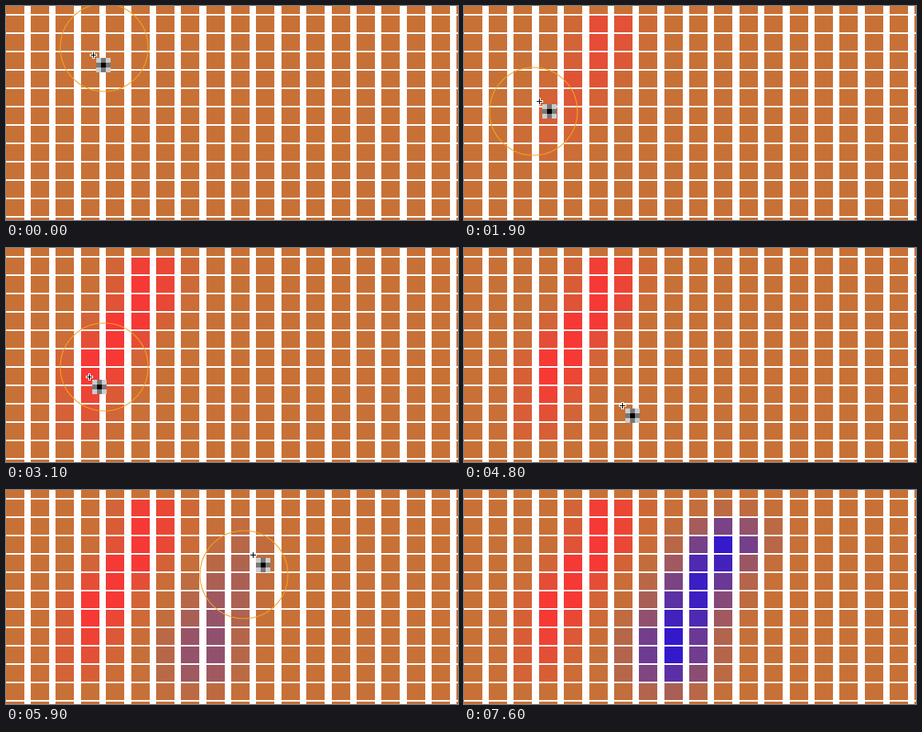
Animation of 566x268 px, one loop 8000 ms. Source, as an HTML page with a canvas:

```html
<!DOCTYPE html>
<html>
<head>
<meta charset="utf-8">
<style>
html, body { margin: 0; width: 100%; height: 100%; overflow: hidden; background: #fff; }
canvas { display: block; }
</style>
</head>
<body>
<canvas id="stage" width="566" height="268"></canvas>
<script>
const ctx = document.getElementById('stage').getContext('2d');
const LOOP = 8000, STEP = 100, LEAD = 60;
const BASE = [200, 113, 55];

const clamp = v => Math.max(0, Math.min(1, v));
const mix = (a, b, k) => a + (b - a) * k;

// Linear interpolation through key points; the first value of each is the parameter
function along(keys, p) {
  let i = keys.findIndex(k => k[0] >= p);
  if (i < 0) i = keys.length - 1;
  i = Math.max(1, i);
  const a = keys[i - 1], b = keys[i];
  const k = clamp((p - a[0]) / (b[0] - a[0]));
  return a.slice(1).map((v, n) => mix(v, b[n + 1], k));
}

// spine: row, centre column, strength; span: when a cell starts and stops filling
const strokes = [
  {
    color: [246, 57, 53], spread: 1.3,
    spine: [[0, 5.5, 0], [1, 5.4, 1], [3, 5.1, 1.35], [5, 4, 1.35],
            [6, 3.5, 1.35], [10, 2.65, 0.35], [11, 2.5, 0]],
    span: (c, r) => [100 + 200 * r, 2400 + 100 * r]
  },
  {
    color: [52, 25, 203], spread: 2,
    spine: [[0.8, 10.5, 0], [3, 10.1, 1], [5, 9.1, 0.95], [8, 8.05, 1],
            [9.5, 7.95, 1], [11.4, 7.8, 0]],
    span: c => [5000 + 230 * (c - 6.5), 6500 + 350 * (c - 7)]
  }
];

// time, brush x, brush y
const path = [
  [0, 123, 52], [300, 53, 102], [600, 223, 22], [900, 100, 95],
  [1200, 185, 30], [1500, 55, 127], [1700, 150, 60], [1900, 87, 132],
  [2300, 134, 52], [2600, 105, 206], [2900, 176, 60], [3100, 123, 149],
  [3200, 91, 171], [3500, 181, 55],
  [4800, 198, 198], [4860, 198, 198], [5000, 285, 78], [5200, 285, 78],
  [5400, 219, 202], [5600, 290, 90], [5750, 235, 190], [5900, 298, 106],
  [6000, 316, 66], [6300, 250, 213], [6600, 350, 55], [6800, 280, 150],
  [6900, 326, 69], [7100, 346, 52], [7300, 257, 212], [7600, 340, 62]
];

function cellColor(c, r, t) {
  let color = BASE;
  for (const { color: paint, spread, spine, span } of strokes) {
    const [centre, strength] = along(spine, r);
    const [from, to] = span(c, r);
    const level = clamp(strength * Math.exp(-((c - centre) ** 2) / spread));
    const k = level * clamp((t - from) / (to - from));
    color = color.map((v, n) => mix(v, paint[n], k));
  }
  return `rgb(${color.map(Math.round)})`;
}

function drawGrid(t) {
  for (let r = 0; r < 13; r++)
    for (let c = 0; c < 19; c++) {
      ctx.fillStyle = cellColor(c, r, t);
      ctx.fillRect(Math.round(31.38 * c - 0.4), 23 * r - 11, 23, 21);
    }
}

function drawBrush(x, y) {
  ctx.strokeStyle = '#f7a21b';
  ctx.lineWidth = 1.1;
  ctx.beginPath();
  ctx.arc(x, y, 55, 0, 2 * Math.PI);
  ctx.stroke();
}

function drawPointer(x, y) {
  const plus = (color, half, width) => {
    ctx.fillStyle = color;
    ctx.fillRect(x - half, y - width / 2, 2 * half, width);
    ctx.fillRect(x - width / 2, y - half, width, 2 * half);
  };
  plus('#fff', 4.5, 3);
  plus('#000', 3.5, 1);
  const shades = ['#000', '#777', '#ccc'];
  for (let i = 0; i < 9; i++) {
    const c = i % 3, r = Math.floor(i / 3);
    ctx.fillStyle = shades[Math.abs(c - 1) + Math.abs(r - 1)];
    ctx.fillRect(x + 3.5 + 6 * c, y + 3.5 + 6 * r, 6, 6);
  }
}

function draw(now) {
  const t = Math.floor((now % LOOP) / STEP) * STEP;
  ctx.fillStyle = '#fff';
  ctx.fillRect(0, 0, 566, 268);
  drawGrid(t);
  const painting = t < 3600 || (t >= 5000 && t < 7600);
  if (painting) drawBrush(...along(path, t));
  if (painting || (t >= 4800 && t < 5000)) {
    const [x, y] = along(path, t + LEAD); // the brush trails the pointer
    drawPointer(Math.round(x) + 0.5, Math.round(y) - 0.5);
  }
}

const start = performance.now();
function frame() {
  draw(performance.now() - start);
  requestAnimationFrame(frame);
}
frame();
</script>
</body>
</html>
```
